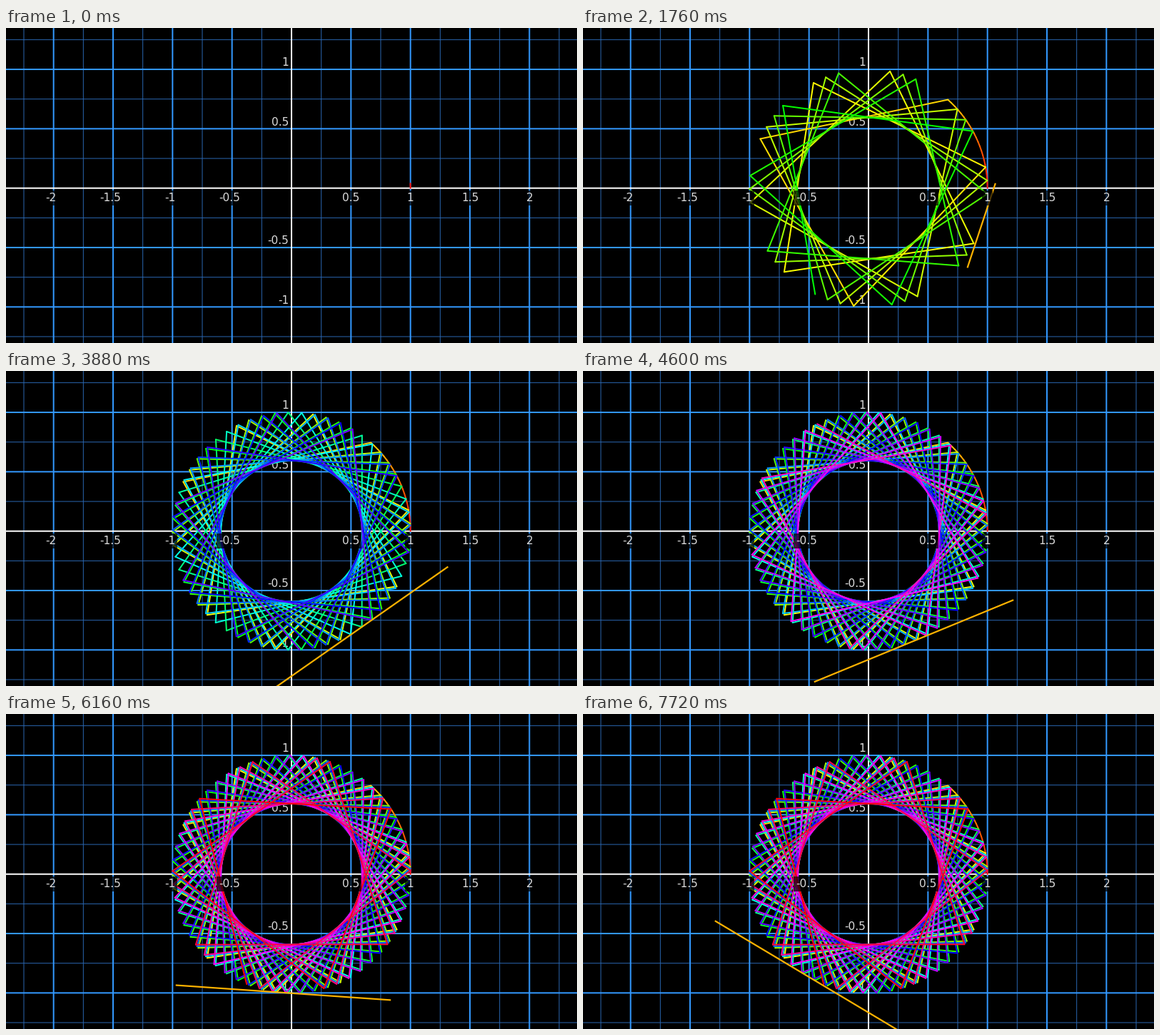
Recreate the animation shown at these times as a matplotlib script. Size 800 by 442 pixels, loop 7760 ms.

```python
import colorsys
import numpy as np
import matplotlib.pyplot as plt
from matplotlib.animation import FuncAnimation
from matplotlib.collections import LineCollection

W, H, DPI = 800, 442, 100
FRAMES, INTERVAL = 194, 40
CX, CY, UNIT = 400, 224.7, 500 / 3
PX = 72 / DPI                    # one pixel in points

DT = 0.04                        # curve parameter per point
ARC = 21                         # points on the smooth arc before the chords
LAST = int(2 * np.pi / DT)
CHORD = 361 * DT                 # angle between chord ends
TANGENT_HALF = 0.9

fig = plt.figure(figsize=(W / DPI, H / DPI), dpi=DPI, facecolor="black")
ax = fig.add_axes([0, 0, 1, 1])
ax.set_xlim(0, W)
ax.set_ylim(H, 0)
ax.axis("off")


def to_px(x, y):
    return np.column_stack([CX + UNIT * np.asarray(x), CY - UNIT * np.asarray(y)])


def rule(value, vertical, color, width, z):
    if vertical:
        x = CX + UNIT * value
        xs, ys = [x, x], [0, H]
    else:
        y = CY - UNIT * value
        xs, ys = [0, W], [y, y]
    ax.plot(xs, ys, color=color, lw=width * PX, zorder=z, snap=False)


def draw_grid():
    for i in range(-9, 10):
        if i == 0:
            continue
        color, width, z = ("#2a66b0", 1, 0) if i % 2 else ("#3399ff", 2, 0.2)
        rule(i / 4, True, color, width, z)
        if abs(i) <= 5:
            rule(i / 4, False, color, width, z)
    rule(0, True, "white", 2, 1)
    rule(0, False, "white", 2, 1)


def label(x, y, value, ha, z, **style):
    ax.text(x, y, f"{value:g}", color="#dcdcdc", family="DejaVu Sans",
            size=15.4 * PX, ha=ha, va="baseline", zorder=z, **style)


def draw_labels():
    shade = dict(fc="black", ec="none", alpha=0.7, pad=3 * PX)
    for i in range(-4, 5):
        if i:
            x = CX + UNIT * i / 2 - (3.5 if i < 0 else 0)
            label(x, CY + 18.3, i / 2, "center", 6, bbox=shade)
    for v in (-1, -0.5, 0.5, 1):
        label(396, CY - UNIT * v - 4.8, v, "right", 1.5)


draw_grid()
draw_labels()

n = np.arange(LAST + 1)
theta = np.where(n <= ARC, DT * n, DT * ARC + CHORD * (n - ARC))
points = to_px(np.cos(theta), np.sin(theta))
segments = np.stack([points[:-1], points[1:]], axis=1)
colors = [colorsys.hsv_to_rgb(DT * i / (2 * np.pi), 1, 1) for i in n[1:]]

curve = LineCollection([], linewidths=2 * PX, capstyle="round", zorder=4)
ax.add_collection(curve, autolim=False)
tangent, = ax.plot([], [], color="#ffb300", lw=2.2 * PX, zorder=5)


def draw(frame):
    step = 6 * frame // 5
    count = min(step + 1, LAST)
    curve.set_segments(segments[:count])
    curve.set_color(colors[:count])

    k = step + 1 - ARC
    if k > 0:
        a = -0.01 * k
        reach = TANGENT_HALF * min(k / 50, 1) ** 2 * np.array([-1, 1])
        ends = to_px(np.cos(a) - reach * np.sin(a), np.sin(a) + reach * np.cos(a))
        tangent.set_data(ends[:, 0], ends[:, 1])
    else:
        tangent.set_data([], [])
    return curve, tangent


anim = FuncAnimation(fig, draw, frames=FRAMES, interval=INTERVAL,
                     repeat=True, repeat_delay=0, blit=False)
plt.show()
```
